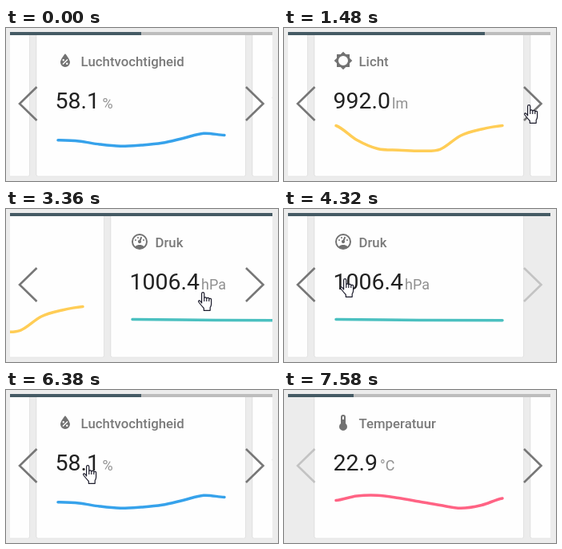
Recreate the animation shown at these times as an HTML page. Size 340 px wide and 192 px high, loop 8000 ms.

```html
<!DOCTYPE html>
<html lang="nl">
<head>
<meta charset="utf-8">
<title>Sensorcarrousel</title>
<style>
  html, body { margin: 0; width: 100%; height: 100%; overflow: hidden; background: #ececec; }
  svg { display: block; width: 100vw; height: 100vh; font-family: Roboto, sans-serif; }
  .card { fill: #fefefe; stroke: rgba(0, 0, 0, .07); }
  .icon { fill: #727272; fill-rule: evenodd; }
  .title { font-size: 16.8px; font-weight: 500; fill: #7a7a7a; }
  .value { font-size: 28.5px; fill: #212121; }
  .unit { font-size: 18px; fill: #909090; }
  .line { fill: none; stroke-width: 3.5; stroke-linecap: round; }
  .arrow { fill: none; stroke: #777; stroke-width: 2.6; }
  .pointer { fill: #fff; stroke: #1b1b2b; stroke-width: 1.2; stroke-linejoin: round; }
</style>
</head>
<body>
<svg viewBox="0 0 340 192">
  <clipPath id="frame"><rect x="5" y="5" width="328" height="181.5"/></clipPath>
  <rect width="340" height="192" fill="#ececec"/>
  <g clip-path="url(#frame)">
    <g id="track"></g>
    <rect x="5" y="5" width="328" height="4" fill="#bdbdbd"/>
    <rect id="bar" x="5" y="5" height="4" fill="#455a64"/>
  </g>
  <path id="prev" class="arrow" d="M38.5 74L17 95L38.5 116"/>
  <path id="next" class="arrow" d="M300 74L321.5 95L300 116"/>
  <path id="hand" class="pointer" d="M-1.4 14V2.2a1.6 1.6 0 0 1 3.2 0V8.2a1.5 1.5 0 0 1 3 .3a1.5 1.5 0 0 1 3 .8a1.4 1.4 0 0 1 2.8 1V15.5q0 2-1.4 4V23.3H1.3V20.5Q-1.5 17.5-5 13Q-6 11-4.2 10.8Q-3 10.9-1.4 14ZM1.8 8.2V12M4.8 8.8V12M7.8 9.5V12"/>
  <path id="plain" class="pointer" d="M.5 0V16.5L4.3 13L7 19L9.2 18L6.7 12.2H12Z"/>
</svg>
<script>
const LOOP = 8000, PITCH = 270, BAR = 328, SETTLE = 300;
const el = id => document.getElementById(id);
const dot = (x, y, r) => `M${x - r} ${y}a${r} ${r} 0 1 0 ${2 * r} 0a${r} ${r} 0 1 0 ${-2 * r} 0Z`;

// Each line is a smooth curve through evenly spaced heights.
const cards = [
  { title: 'Temperatuur', value: '22.9', unit: '°C', unitX: 120, color: '#ff6384',
    icon: 'M15 13V5A3 3 0 0 0 9 5V13A5 5 0 1 0 15 13M12 4A1 1 0 0 1 13 5V8H11V5A1 1 0 0 1 12 4Z',
    heights: [138.5, 133, 132.2, 135.5, 140, 144.5, 148.3, 144.5, 136] },
  { title: 'Luchtvochtigheid', value: '58.1', unit: '%', unitX: 120.5, color: '#36a2eb',
    icon: 'M12 3.25C12 3.25 6 10 6 14A6 6 0 0 0 18 14C18 10 12 3.25 12 3.25M14.47 9.97L15.53 11.03L9.53 17.03L8.47 15.97Z'
      + dot(9.75, 11.25, 1.25) + dot(14.25, 15.75, 1.25),
    heights: [140.8, 142, 146, 148.3, 147, 144.3, 138.5, 132.3, 134.5] },
  { title: 'Licht', value: '992.0', unit: 'lm', unitX: 135, color: '#ffcd56',
    icon: 'M20 15.31L23.31 12L20 8.69V4H15.31L12 .69L8.69 4H4V8.69L.69 12L4 15.31V20H8.69L12 23.31L15.31 20H20Z' + dot(12, 12, 6),
    heights: [122.5, 140.5, 151.5, 153.3, 154.2, 152.3, 135, 127, 122.5] },
  { title: 'Druk', value: '1006.4', unit: 'hPa', unitX: 151, color: '#4bc0c0',
    icon: dot(12, 12, 10) + 'M12 4A8 8 0 0 1 20 12C20 14.4 19 16.5 17.3 18C14.5 15.4 9.5 15.4 6.7 18C5 16.5 4 14.4 4 12A8 8 0 0 1 12 4Z'
      + 'M13.1 6.5L11.7 10A2 2 0 1 0 13.57 10.76L14.96 7.29A1 1 0 0 0 13.1 6.5Z'
      + dot(10, 7, 1) + dot(7, 10, 1) + dot(17, 10, 1),
    heights: [138.6, 139.4, 139.8] }
];
const END = PITCH * (cards.length - 1);

function curve(heights) {
  const last = heights.length - 1, step = 208 / last;
  const y = i => heights[Math.max(0, Math.min(last, i))];
  let path = `M65 ${y(0)}`;
  for (let i = 0; i < last; i++) {
    const x = 65 + i * step;
    path += `C${x + step / 3} ${y(i) + (y(i + 1) - y(i - 1)) / 6} `
      + `${x + step * 2 / 3} ${y(i + 1) - (y(i + 2) - y(i)) / 6} ${x + step} ${y(i + 1)}`;
  }
  return path;
}

el('track').innerHTML = cards.map((c, i) => `
  <g transform="translate(${i * PITCH})">
    <rect class="card" x="38" y="2" width="261.5" height="184" rx="2"/>
    <path class="icon" transform="translate(62 29)" d="${c.icon}"/>
    <text class="title" x="93.5" y="48">${c.title}</text>
    <text class="value" x="61.5" y="101">${c.value}</text>
    <text class="unit" x="${c.unitX}" y="100.5">${c.unit}</text>
    <path class="line" stroke="${c.color}" d="${curve(c.heights)}"/>
  </g>`).join('');

const progress = (t, start, length) => Math.max(0, Math.min(1, (t - start) / length));
const smooth = p => p * p * (3 - 2 * p);
const easeOut = p => 1 - (1 - p) ** 2.3;

// Pointer trips: start, duration, destination.
const trips = [
  { at: 300, ms: 390, x: 306, y: 96 },
  { at: 2630, ms: 260, x: 153, y: 86 },
  { at: 3240, ms: 120, x: 246, y: 104 },
  { at: 3440, ms: 360, x: 76, y: 87 },
  { at: 4330, ms: 120, x: 329, y: 100 },
  { at: 4500, ms: 460, x: 193, y: 95 },
  { at: 4970, ms: 290, x: 122, y: 88 },
  { at: 5400, ms: 140, x: 154, y: 91 },
  { at: 5570, ms: 150, x: 304, y: 110 },
  { at: 6130, ms: 250, x: 102, y: 94 },
  { at: 6760, ms: 300, x: 290, y: 138 },
  { at: 7380, ms: 160, x: 301, y: 200 }
];

// Between grab and release the cards follow the pointer; a click has no drag.
const swipes = [
  { grab: 1150, release: 1150, card: 2 },
  { grab: 1940, release: 1940, card: 3 },
  { grab: 3240, release: 3700, card: 3 },
  { grab: 4330, release: 4500, card: 2 },
  { grab: 5520, release: 5680, card: 1 },
  { grab: 6760, release: 6960, card: 0 }
];

function pointerAt(t) {
  let x = 341, y = 73;
  for (const trip of trips) {
    const p = smooth(progress(t, trip.at, trip.ms));
    x += (trip.x - x) * p;
    y += (trip.y - y) * p;
  }
  return { x, y };
}

function carouselAt(t) {
  let card = 1, scroll = PITCH, goal = PITCH, bar = 2;
  for (const swipe of swipes) {
    if (t < swipe.grab) break;
    const dragged = pointerAt(Math.min(t, swipe.release)).x - pointerAt(swipe.grab).x;
    scroll = card * PITCH - dragged;
    if (scroll > END) scroll = END + (scroll - END) / 4;
    goal = scroll;
    if (t < swipe.release) break;
    const p = easeOut(progress(t, swipe.release, SETTLE));
    card = swipe.card;
    goal = card * PITCH;
    scroll += (goal - scroll) * p;
    bar += (card + 1 - bar) * p;
  }
  return { scroll, goal, bar };
}

function draw(t) {
  const { scroll, goal, bar } = carouselAt(t);
  el('track').setAttribute('transform', `translate(${-scroll})`);
  el('bar').setAttribute('width', BAR * bar / cards.length);
  el('prev').setAttribute('opacity', goal <= 0 ? .35 : 1);
  el('next').setAttribute('opacity', goal >= END ? .35 : 1);

  const { x, y } = pointerAt(t);
  const outside = x > 333 || y > 186;
  for (const id of ['hand', 'plain']) {
    el(id).setAttribute('transform', `translate(${x} ${y})`);
    el(id).setAttribute('visibility', (id === 'plain') === outside ? 'visible' : 'hidden');
  }
}

function tick() {
  draw(performance.now() % LOOP);
  requestAnimationFrame(tick);
}
tick();
</script>
</body>
</html>
```
